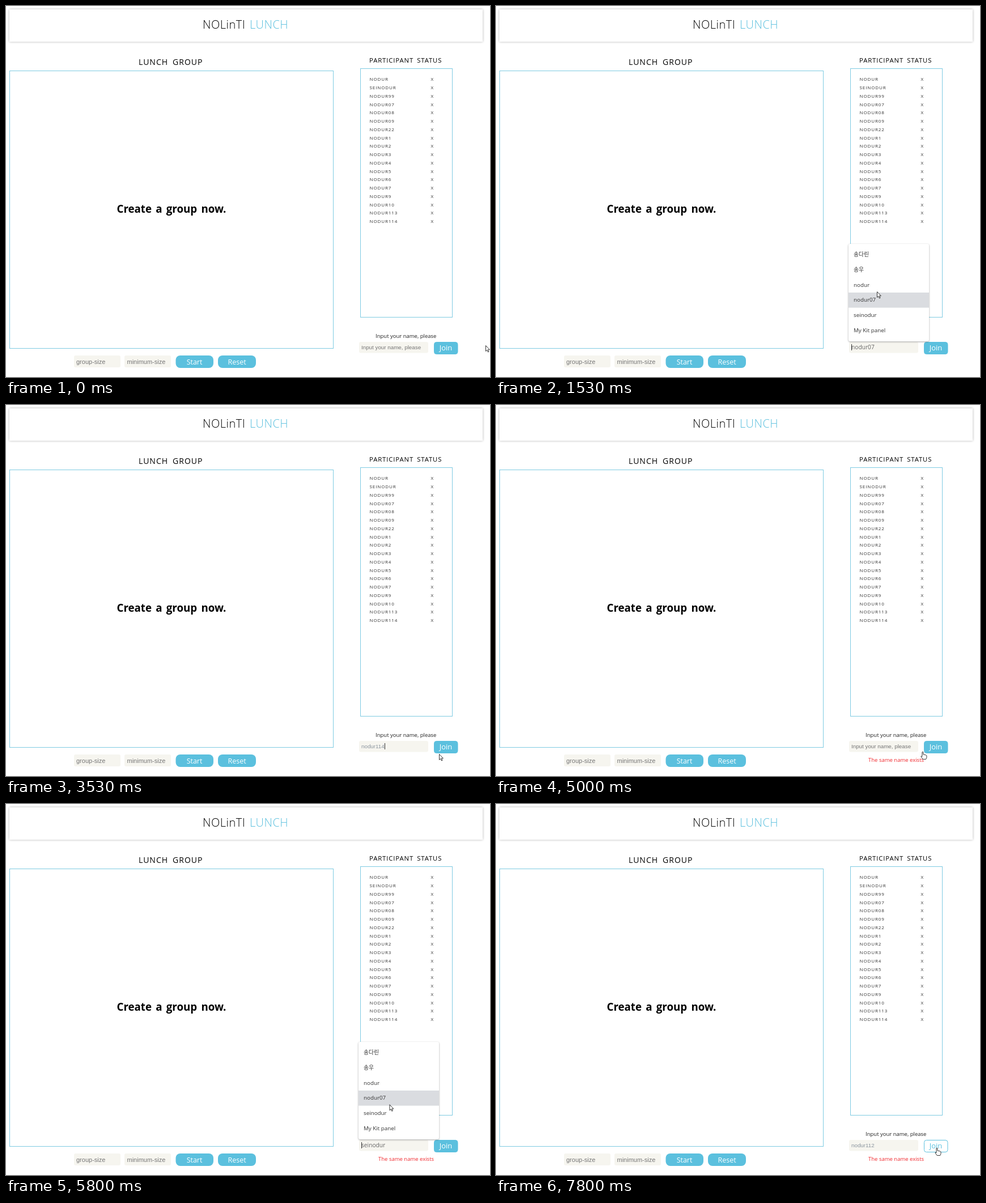
Write an HTML page that moves like this. It is 854 px wide and 655 px high and loops after 8 s.

```html
<!DOCTYPE html>
<html lang="en">
<head>
<meta charset="utf-8">
<title>Lunch groups</title>
<style>
  html, body { margin: 0; width: 100%; height: 100%; overflow: hidden; background: #fff; }
  svg { display: block; width: 100vw; height: 100vh; }
  text { font-family: "Open Sans", "Noto Sans CJK KR", "Noto Sans CJK", sans-serif; white-space: pre; }
  .arial { font-family: "Liberation Sans", Arial, sans-serif; }
  .panel { fill: #fff; stroke: #7fcbe2; }
  .field { fill: #f6f5ef; }
  .button { fill: #5bc0de; }
  .caption { fill: #fff; font-size: 12.5px; text-anchor: middle; }
  #join .button { stroke: #5bc0de; }
  #join .caption { font-size: 13px; }
  #join.hover .button { fill: #fff; }
  #join.hover .caption { fill: #5bc0de; }
  .hint { fill: #757575; font-size: 11px; }
  .row { fill: #333; font-size: 8px; letter-spacing: .9px; }
  .option { fill: #333; font-size: 9.8px; }
  .header { fill: #fff; filter: drop-shadow(0 .5px 2px rgba(0, 0, 0, .3)); }
  .sheet { fill: #fff; filter: drop-shadow(0 1px 1.5px rgba(0, 0, 0, .35)); }
  #cursor path { fill: #fff; stroke: #222; stroke-width: .9; stroke-linejoin: round; }
</style>
</head>
<body>
<svg viewBox="0 0 854 655" preserveAspectRatio="none">
  <rect class="header" x="6" y="6" width="835" height="57"/>
  <g font-size="20" font-weight="350" letter-spacing=".5">
    <text x="347" y="40">NOLinTI</text>
    <text x="430" y="40" fill="#5bc0de">LUNCH</text>
  </g>
  <text x="234" y="104" font-size="14" letter-spacing="1" word-spacing="3.4">LUNCH GROUP</text>
  <text x="641" y="100" font-size="11.3" letter-spacing=".9" word-spacing="2.3">PARTICIPANT STATUS</text>
  <rect class="panel" x="6.5" y="114.5" width="571" height="490"/>
  <rect class="panel" x="625.5" y="110.5" width="162" height="439"/>
  <text x="195.5" y="365" font-size="18.7" font-weight="700" word-spacing="2.4">Create a group now.</text>
  <g id="rows"></g>

  <rect class="field" x="120" y="617" width="82" height="21" rx="3"/>
  <text class="arial hint" x="124" y="631.5">group-size</text>
  <rect class="field" x="209" y="617" width="82" height="21" rx="3"/>
  <text class="arial hint" x="213.5" y="631.5">minimum-size</text>
  <rect class="button" x="299.5" y="617" width="66.5" height="22" rx="8"/>
  <text class="caption" x="332.5" y="632.5">Start</text>
  <rect class="button" x="374" y="617" width="67" height="22" rx="8"/>
  <text class="caption" x="407.5" y="632.5">Reset</text>

  <text x="652" y="586" font-size="9.5" fill="#222">Input your name, please</text>
  <rect id="box" x="623" y="593" width="122" height="19.5" rx="3"/>
  <text id="value" x="627" y="606"></text>
  <rect id="caret" y="597" width="1" height="11" fill="#333"/>
  <g id="join">
    <rect class="button" x="755.5" y="593.5" width="41.5" height="21" rx="4"/>
    <text class="caption" x="776" y="608">Join</text>
  </g>
  <text id="error" x="657" y="629.5" font-size="9.5" fill="#f0282d">The same name exists</text>

  <g id="menu">
    <rect class="sheet" x="622" y="420" width="142" height="172" rx="3"/>
    <rect id="highlight" x="622" width="142" height="26.7" fill="#dadce0"/>
  </g>

  <g id="cursor">
    <path id="arrow" d="M.5 .5V10.5L2.8 8.4 4.4 12 6 11.3 4.4 7.8H7.4Z"/>
    <path id="hand" d="M-1 1Q0-.8 1 1V5L5.5 6Q7 6.3 7 8V10.5L5.7 13.5H.2L-3 9Q-3.2 7.3-1 8.6Z"/>
    <path id="beam" d="M-2-5H2M0-5V5M-2 5H2" style="fill:none"/>
  </g>
</svg>
<script>
const LOOP = 8000, FRAME = 200 / 3;
const ROW_TOP = 425.8, ROW_HEIGHT = 26.7;
const KEY_DELAY = 133, BLINK = 533, USER = "nodur";
const $ = id => document.getElementById(id);
const show = (id, on) => $(id).setAttribute("display", on ? "inline" : "none");
const setAttributes = (node, values) =>
  Object.entries(values).forEach(([name, value]) => node.setAttribute(name, value));

function addText(parent, x, y, string, className) {
  const node = document.createElementNS("http://www.w3.org/2000/svg", "text");
  setAttributes(node, { x, y, class: className });
  node.textContent = string;
  parent.append(node);
}

const suffixes = "99 07 08 09 22 1 2 3 4 5 6 7 9 10 113 114".split(" ");
[USER, "sei" + USER, ...suffixes.map(s => USER + s)].forEach((name, i) => {
  const y = 132.3 + i * 14.75;
  addText($("rows"), 641.5, y, name.toUpperCase(), "row");
  addText($("rows"), 749.5, y, "X", "row");
});

const options = ["송다린", "송우", USER, USER + "07", "sei" + USER, "My Kit panel"];
options.forEach((name, i) => addText($("menu"), 631, 442.3 + i * ROW_HEIGHT, name, "option"));

// Each attempt: open the menu, pick a name, type a suffix, submit.
const attempts = [
  { open: 867, pick: 2000, type: 2800, suffix: "114", submit: 4400 },
  { open: 5267, pick: 6200, type: 6933, suffix: "112", submit: LOOP }
];

// Pointer moves to x, y; each one eases out and sags with its horizontal reach.
const moves = [
  { from: 67, to: 467, x: 673, y: 613 },
  { from: 600, to: 733, x: 677, y: 602 },
  { from: 1400, to: 1533, x: 672, y: 504 },
  { from: 1600, to: 2000, x: 668, y: 490 },
  { from: 2000, to: 2267, x: 711, y: 605 },
  { from: 3400, to: 3533, x: 764, y: 616 },
  { from: 3533, to: 4067, x: 783, y: 604 },
  { from: 4933, to: 5333, x: 685, y: 604 },
  { from: 5467, to: 6267, x: 672, y: 492 },
  { from: 6267, to: 6733, x: 701, y: 612 },
  { from: 7333, to: 7800, x: 778, y: 607 }
];

function pointer(t) {
  let x = 846, y = 599;
  for (const move of moves.filter(m => m.from <= t)) {
    const left = 1 - Math.min(1, (t - move.from) / (move.to - move.from));
    const p = 1 - left * left;
    const dx = move.x - x;
    x += dx * p;
    y += (move.y - y) * p + dx * dx / 1000 * Math.sin(Math.PI * p);
  }
  return { x, y };
}

function attemptAt(t) {
  const attempt = attempts.findLast(a => a.open <= t);
  return attempt && t < attempt.submit ? attempt : null;
}

const menuOpenAt = t => t < (attemptAt(t)?.pick ?? 0);

function hoveredOption(t) {
  const row = Math.floor((pointer(t).y + 2 - ROW_TOP) / ROW_HEIGHT);
  return menuOpenAt(t) && row < options.length ? row : -1;
}

function fieldState(t) {
  const attempt = attemptAt(t);
  if (!attempt) return { string: "" };
  const { open, pick, type, suffix } = attempt;
  if (t < pick) {
    // The preview follows the highlighted option one frame late.
    const row = hoveredOption(Math.round(t - FRAME));
    const preview = row >= 0;
    return { string: preview ? options[row] : "", preview, filled: preview && t - open > 700, lastInput: open };
  }
  if (t < type) return { string: USER, filled: true, lastInput: pick };
  const count = Math.min(suffix.length, 1 + Math.floor((t - type) / KEY_DELAY));
  return { string: USER + suffix.slice(0, count), lastInput: type + (count - 1) * KEY_DELAY };
}

function drawField(t, menuOpen, overJoin) {
  const { string, preview, filled, lastInput } = fieldState(t);
  const value = $("value");
  value.textContent = string || "Input your name, please";
  setAttributes(value, {
    class: preview ? "" : "arial",
    "font-size": preview ? 10.2 : 9.8,
    fill: filled ? "#111" : preview ? "#666" : string ? "#8a949e" : "#757575"
  });
  $("box").setAttribute("fill", filled ? "#e8f0fe" : "#f6f5ef");
  const end = menuOpen || !string ? 0 : value.getComputedTextLength();
  $("caret").setAttribute("x", Math.round(627 + end));
  show("caret", preview || !overJoin && (t - lastInput) % (2 * BLINK) < BLINK);
}

function drawPointer(t, menuOpen) {
  const { x, y } = pointer(t);
  const overField = !(menuOpen && y < 592) && x >= 623 && x < 745 && y >= 593 && y < 613;
  const overJoin = x >= 750 && x < 797 && y >= 593 && y < 615;
  const typing = attempts.some(a => t >= a.type && t < a.type + 3 * KEY_DELAY);
  $("cursor").setAttribute("transform", `translate(${x} ${y})`);
  show("cursor", !typing);
  show("beam", overField);
  show("hand", overJoin);
  show("arrow", !overField && !overJoin);
  $("join").setAttribute("class", overJoin && x >= 755 ? "hover" : "");
  return overJoin;
}

function draw(now) {
  const t = Math.round(Math.floor((now % LOOP + 5) / FRAME) * FRAME) % LOOP;
  const menuOpen = menuOpenAt(t);
  const row = hoveredOption(t);
  show("menu", menuOpen);
  show("highlight", row >= 0);
  $("highlight").setAttribute("y", ROW_TOP + Math.max(row, 0) * ROW_HEIGHT);
  show("error", t >= attempts[0].submit);
  drawField(t, menuOpen, drawPointer(t, menuOpen));
}

let start;
function tick(now) {
  start ??= now;
  draw(now - start);
  requestAnimationFrame(tick);
}
draw(0);
requestAnimationFrame(tick);
</script>
</body>
</html>
```
